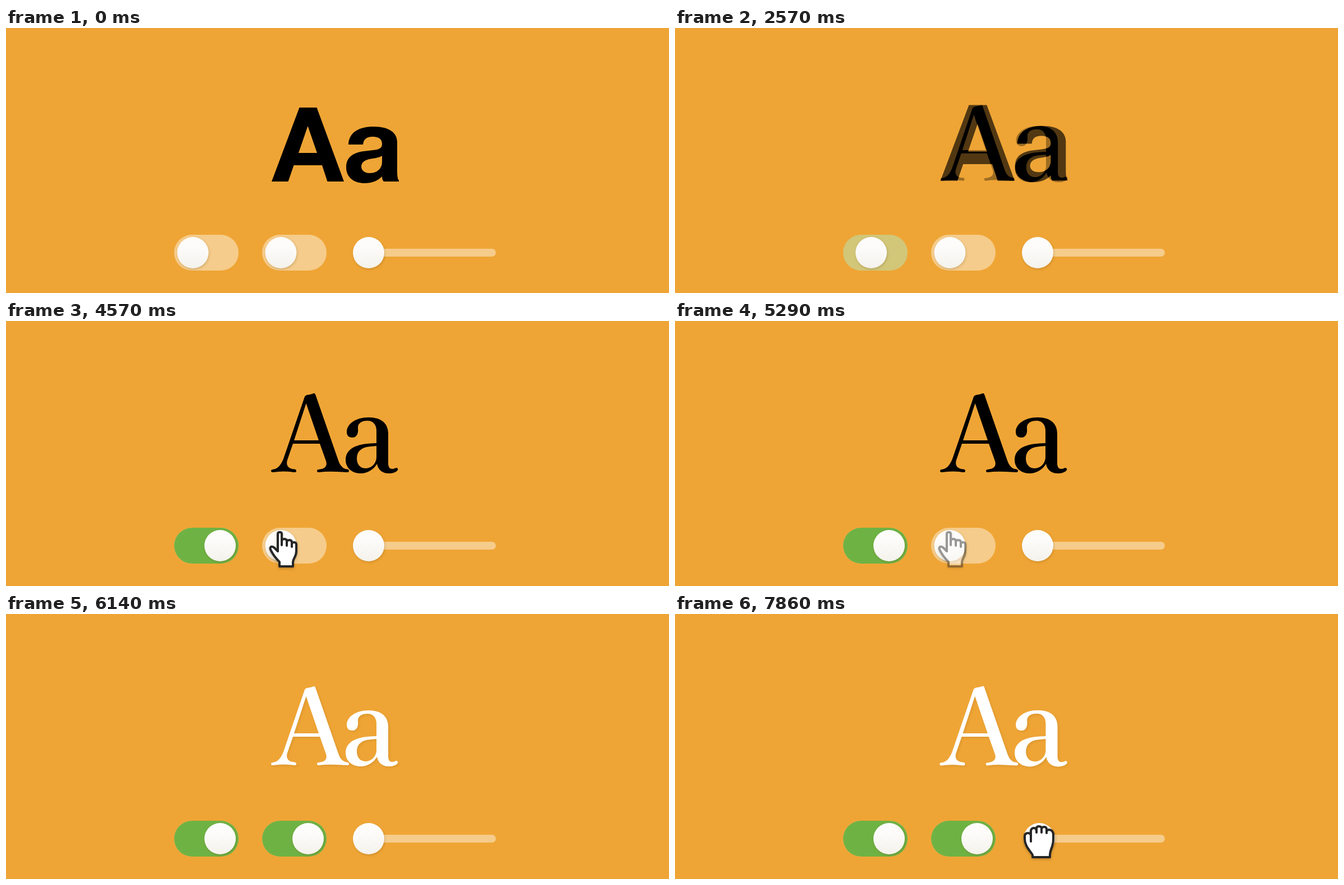
An HTML page that plays this animation: 1183 by 473 pixels, repeating every 8 s.

```html
<!DOCTYPE html>
<html lang="en">
<head>
<meta charset="utf-8">
<title>Type switches</title>
<style>
  html, body { margin: 0; width: 100%; height: 100%; overflow: hidden; background: #efa535; }
  svg { display: block; width: 100%; height: 100%; }
  #type { isolation: isolate; }
  #type g { mix-blend-mode: plus-lighter; }
  .off { fill: #f5cc8b; }
  .on { fill: #6fb244; opacity: 0; }
  .knob { fill: url(#shine); filter: drop-shadow(1px 2px 2px rgba(80, 50, 0, .2)); }
  .hand { fill: #fff; stroke: #262626; stroke-width: 4; stroke-linejoin: round; opacity: 0;
    filter: drop-shadow(0 2px 2px rgba(60, 35, 0, .3)); }
</style>
</head>
<body>
<svg viewBox="0 0 1183 473" role="img" aria-label="Aa">
  <defs>
    <linearGradient id="shine" x2="0" y2="1">
      <stop offset=".3" stop-color="#fdfcfa"/>
      <stop offset="1" stop-color="#f4f2ec"/>
    </linearGradient>
  </defs>

  <g id="type" fill-rule="evenodd">
    <g id="sans">
      <path d="M523.5 142H554.500L603 274H573.500L564 245H513.500L503.500 274H474ZM538.500 175L522 223H555Z"/>
      <path d="M611 208C612 186 630 176 656 176C684 176 698 187 698 204V255C698 265 699 270 701 272V274H674C672 272 671 269 671 265C663 273 653 277 640 277C620 277 607 266 607 249C607 231 618 223 638 220L655 218C667 216.500 671 214 671 207C671 199 666 194 654 194C643 194 638 199 637 208ZM671 228C667 231 660 232 651 233.500C640 235.500 634 240 634 247.500C634 254 640 259 649 259C662 259 671 251 671 239Z"/>
    </g>
    <g id="serif">
      <path d="M533 135Q534 133 537 132Q545 131 549 129Q551 128.500 552 131L593 249Q598 264 609 264.500Q612 265 612 267.500Q612 270 609 270L590 269Q572 268 558 270Q555 270 555 267.500Q555 265 558 265C568 264 574 260 571 250L560 219H512L502 248C499 258 504 264 515 264.500Q518 265 518 267.500Q518 270 515 270Q495 267 476 270Q473 270 473 267.500Q473 265 476 265Q488 264 495 246ZM535.500 147L514 213H558Z"/>
      <path d="M618 208C611 208 608 204 608 198C608 184 624 172 647 172C670 172 682 183 682 201V254C682 261 685 264 689 264C693 264 695 262 697 262Q700 263 699 266C696 270 690 272 683 272C672 272 664 266 662 255C656 265 645 272 633 272C617 272 606 262 606 248C606 230 622 220 650 218.500L661 218V196C661 185 655 178 645 178C634 178 627 183 628 192C629 202 625 208 618 208ZM661 223L650 224C634 225 626 233 626 245C626 256 632 263 642 263C652 263 661 254 661 243Z"/>
    </g>
  </g>

  <g id="face">
    <rect class="off" x="300" y="369" width="115" height="64" rx="32"/>
    <rect class="on" x="300" y="369" width="115" height="64" rx="32"/>
    <circle class="knob" cx="333.500" cy="401" r="28"/>
  </g>
  <g id="tint">
    <rect class="off" x="457" y="369" width="115" height="64" rx="32"/>
    <rect class="on" x="457" y="369" width="115" height="64" rx="32"/>
    <circle class="knob" cx="490.500" cy="401" r="28"/>
  </g>
  <rect class="off" x="630" y="394" width="244" height="14" rx="7"/>
  <circle class="knob" id="thumb" cx="647" cy="401" r="28"/>

  <path class="hand" id="point" d="M365 414V383Q365 380 368.500 380Q372 380 372 383V403V396Q372 392 376.500 392Q381 392 381 396V404V398Q381 394 385.500 394Q390 394 390 398V406V401Q390 398 394 398Q398 398 398 402V414C398 424 392 427 392 433V441H368V433C363 428 357 421 353 413Q350 408 353 406Q356 405 359 408Z"/>
  <path class="hand" id="fist" d="M638 434V430C634 423 624 414 624 402V397Q624 391 630 391Q635 391 635 396V406V387Q636 382 640 382Q644 382 645 386V390V383Q645 379 649 379Q654 379 654 383V390V384Q654 380 659 380Q663 380 663 385V391V388Q664 385 668 385Q675 386 675 394V402C675 416 669 420 669 430V434Z"/>
</svg>
<script>
  const LOOP = 8000, FRAME = 1000 / 7;
  const $ = id => document.getElementById(id);
  const lerp = (a, b, p) => a + (b - a) * p;
  const ramp = (t, start, span) => Math.min(1, Math.max(0, (t - start) / span));
  const ease = x => (1 - Math.cos(Math.PI * x)) / 2;
  const flash = (t, from, to) => ramp(t, from, 280) * (1 - ramp(t, to - 250, 250));

  // Glyph boxes: left, top, right, bottom
  const boxes = {
    sans: [[474, 142, 603, 274], [607, 176, 701, 277]],
    serif: [[473, 129, 612, 270], [606, 172, 699, 272]]
  };

  function fit(path, from, to) {
    const sx = (to[2] - to[0]) / (from[2] - from[0]);
    const sy = (to[3] - to[1]) / (from[3] - from[1]);
    path.setAttribute('transform',
      `matrix(${sx} 0 0 ${sy} ${to[0] - sx * from[0]} ${to[1] - sy * from[1]})`);
  }

  function morph(p) {
    for (const name of ['sans', 'serif']) {
      const group = $(name);
      group.style.opacity = name === 'sans' ? 1 - p : p;
      [...group.children].forEach((path, i) => {
        const box = boxes.sans[i].map((v, k) => lerp(v, boxes.serif[i][k], p));
        fit(path, boxes[name][i], box);
      });
    }
  }

  function flip(id, p) {
    const [, on, knob] = $(id).children;
    on.style.opacity = p ** 1.25;
    knob.setAttribute('transform', `translate(${48.5 * p} 0)`);
  }

  function render(t) {
    const face = ease(ramp(t, 2333, 600));
    const tint = ease(ramp(t, 5402, 600));
    const drag = 3 * (Math.max(0, t - 7700) / 157) ** 2;

    flip('face', face);
    flip('tint', tint);
    morph(face);

    const shade = Math.round(255 * tint), type = $('type');
    type.setAttribute('fill', `rgb(${shade},${shade},${shade})`);
    type.style.filter = tint ? `drop-shadow(2px 2px 2px rgba(90,50,0,${0.12 * tint}))` : 'none';
    const size = 1 + 0.002 * drag;
    type.setAttribute('transform', `translate(586 204) scale(${size}) translate(-586 -204)`);

    $('thumb').setAttribute('cx', 647 + drag);
    $('fist').setAttribute('transform', `translate(${drag - 3} 0)`);
    $('fist').style.opacity = ramp(t, 6900, 280);

    const second = t > 3000;
    $('point').setAttribute('transform', second ? 'translate(120 -3)' : '');
    $('point').style.opacity = second ? flash(t, 4080, 5400) : flash(t, 1000, 2330);
  }

  function tick() {
    const t = performance.now() % LOOP;
    render(Math.floor((t + 5) / FRAME) * FRAME % LOOP);
    requestAnimationFrame(tick);
  }
  tick();
</script>
</body>
</html>
```
